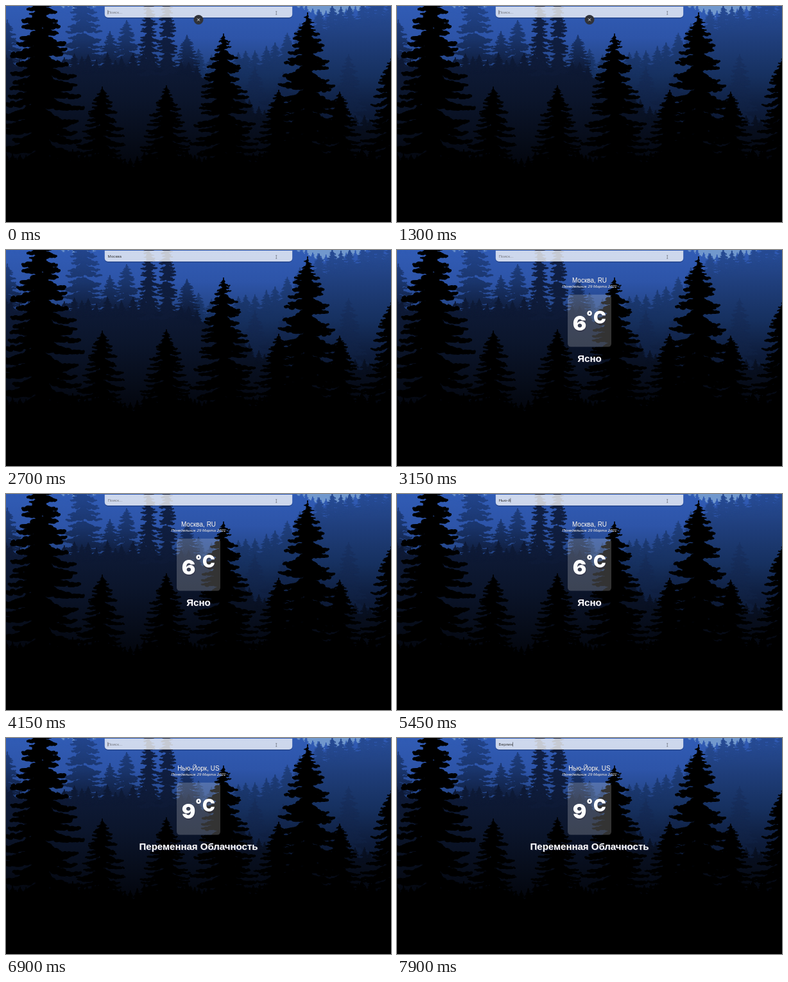
An HTML page with a canvas that plays this animation: 600x338 px, repeating every 8 s.

```html
<!DOCTYPE html>
<html lang="ru">
<head>
<meta charset="utf-8">
<title>Погода</title>
<style>
  html, body { margin: 0; width: 100%; height: 100%; overflow: hidden; background: #000; }
  canvas { display: block; width: 600px; height: 338px; }
</style>
</head>
<body>
<canvas id="stage" width="600" height="338"></canvas>
<script>
const W = 600, H = 338, LOOP = 8000;
const SANS = '"Liberation Sans", Arial, sans-serif';
const BLACK = 'Inter, "Noto Sans", sans-serif';
const ctx = document.getElementById('stage').getContext('2d');

const clamp = v => Math.min(1, Math.max(0, v));
const smooth = v => { const u = clamp(v); return u * u * (3 - 2 * u); };

function seeded(seed) {
  return () => {
    seed = (seed * 1664525 + 1013904223) >>> 0;
    return seed / 4294967296;
  };
}

function vertical(c, y0, y1, ...colors) {
  const g = c.createLinearGradient(0, y0, 0, y1);
  colors.forEach((color, i) => g.addColorStop(i / (colors.length - 1), color));
  return g;
}

function disc(c, x, y, rx, ry = rx) {
  c.beginPath();
  c.ellipse(x, y, rx, ry, 0, 0, 2 * Math.PI);
  c.fill();
}

// Rows of drooping branches, thick at the trunk and ragged towards the tips.
function fir(c, x, top, base, half) {
  const rnd = seeded(Math.round(x * 131 + top * 17 + 9000));
  const tall = base - top;
  const gap = 2.5 + tall * 0.03;
  c.fillRect(x - 0.8, top - 3, 1.6, tall);
  for (let y = top; y < base; y += gap * (0.5 + 0.5 * clamp((y - top) / 60))) {
    const reach = 1.5 + half * Math.pow(clamp((y - top) / tall / 0.6), 0.7);
    for (const side of [-1, 1]) {
      const length = reach * (0.72 + rnd() * 0.4);
      const root = y + (rnd() - 0.5) * gap * 0.7;
      const droop = length * (0.12 + rnd() * 0.2);
      const girth = Math.min(gap, 1.2 + length * 0.35);
      for (let d = 0; d <= length; d += 1.6) {
        const u = d / length;
        const r = girth * (0.62 - 0.42 * u) * (0.75 + rnd() * 0.5);
        disc(c, x + side * d, root + droop * Math.sin(u * 2) + (rnd() - 0.5) * r, r * 1.1, r * 0.9);
      }
    }
  }
}

// A band of ground under a line, edged with small random firs.
function hill(c, fill, line, { from = 0, to = W, step, height }) {
  const rnd = seeded(Math.round(step * 100 + height));
  c.fillStyle = fill;
  c.beginPath();
  c.moveTo(from, H);
  for (let x = from; x <= to; x += 4) c.lineTo(x, line(x));
  c.lineTo(to, H);
  c.fill();
  for (let x = from; x <= to; x += step * (0.6 + rnd() * 0.8)) {
    const tall = height * (0.4 + rnd() * 0.6);
    fir(c, x, line(x) - tall, line(x) + 8, 3 + tall * 0.28);
  }
}

function paintForest() {
  const cv = document.createElement('canvas');
  cv.width = W;
  cv.height = H;
  const c = cv.getContext('2d');
  const haze = vertical(c, 0, 200, '#315cb5', '#2d54a8', '#22427f', '#152b57', '#0c1833');
  c.fillStyle = haze;
  c.fillRect(0, 0, W, H);
  c.filter = 'blur(0.6px)';

  const pale = x => 12 * Math.exp(-(((x - 112) / 32) ** 2)) + 24 * Math.exp(-(((x - 510) / 48) ** 2)) - 4;
  c.fillStyle = '#7198cd';
  c.fillRect(70, -5, 84, 20);
  c.fillRect(446, -5, 154, 35);
  hill(c, haze, pale, { step: 8, height: 9 });

  const farSlope = x => 104 - 84 * smooth((x - 350) / 210);
  hill(c, vertical(c, 10, 210, '#264a92', '#1e3c77', '#16305f', '#0e1d3d', '#081122'), farSlope,
    { from: 300, step: 17, height: 36 });

  const nearSlope = x => 96 + 92 * smooth((x - 255) / 190);
  const slopeTop = '#0e1a36';
  c.fillStyle = vertical(c, 0, 100, '#23458c', '#1a356c', slopeTop);
  [[2, 24], [120, -30], [162, 42], [188, 25], [282, 48]]
    .forEach(([x, top]) => fir(c, x, top, 108, 9 + (108 - top) * 0.16));
  c.fillStyle = vertical(c, 70, 210, '#1a3468', '#12254b', '#0a152c');
  [[388, 98], [432, 106], [534, 78]].forEach(([x, top]) => fir(c, x, top, 230, 30));

  hill(c, vertical(c, 90, 260, slopeTop, '#0b152b', '#070d1b', '#02040a'), nearSlope,
    { step: 13, height: 20 });
  c.fillStyle = vertical(c, 0, 100, '#11224a', slopeTop);
  for (const x of [222, 251]) fir(c, x, -26, 104, 14);

  c.fillStyle = '#000';
  [[55, -38], [470, 13], [339, 46], [150, 129], [250, 127], [425, 134], [520, 137], [603, 78]]
    .forEach(([x, top]) => fir(c, x, top, 260, 18 + (260 - top) * 0.14));
  hill(c, '#000', x => 249 + 5 * Math.sin(x / 23), { step: 8, height: 22 });
  return cv;
}

const forest = paintForest();

const bursts = [
  { keys: 'Москва', at: 1650, step: 110 },
  { keys: 'Нью-й', at: 4300, step: 200 },
  { keys: 'орк', at: 5550, step: 125 },
  { keys: 'Бе', at: 6950, step: 350 },
  { keys: 'рлин', at: 7450, step: 150 }
];
const reports = [
  { at: 2800, city: 'Москва, RU', degrees: '6', sky: 'Ясно' },
  { at: 6000, city: 'Нью-Йорк, US', degrees: '9', sky: 'Переменная Облачность' }
];
const strokes = bursts.flatMap(({ keys, at, step }) =>
  [...keys].map((key, i) => ({ key, at: at + i * step })));

function shadowed(offsetX, offsetY, color, draw) {
  ctx.save();
  ctx.shadowColor = color;
  ctx.shadowOffsetX = offsetX;
  ctx.shadowOffsetY = offsetY;
  draw();
  ctx.restore();
}

function label(text, x, y, font, color = '#fff', align = 'center') {
  ctx.font = font;
  ctx.textAlign = align;
  ctx.fillStyle = color;
  ctx.fillText(text, x, y);
}

function line(...points) {
  ctx.beginPath();
  points.forEach(([x, y], i) => (i ? ctx.lineTo(x, y) : ctx.moveTo(x, y)));
  ctx.stroke();
}

function searchBar(y) {
  ctx.beginPath();
  ctx.roundRect(153.8, y, 292.4, 17, [0, 0, 5, 5]);
}

function drawSearch(t, sentAt) {
  searchBar(2.5);
  ctx.fillStyle = 'rgba(0,0,0,.2)';
  ctx.fill();
  ctx.save();
  searchBar(1);
  ctx.clip();
  ctx.drawImage(forest, 0, 0);
  ctx.fillStyle = 'rgba(255,255,255,.76)';
  ctx.fillRect(0, 0, W, 20);
  ctx.restore();

  const typed = strokes.filter(s => s.at <= t);
  const text = typed.filter(s => s.at > sentAt).map(s => s.key).join('');
  const left = 158.6;
  label(text || 'Поиск...', left, 12, '6.25px ' + SANS, text ? '#313131' : '#74767e', 'left');

  const lastKey = typed.length ? typed[typed.length - 1].at : 0;
  if ((t - lastKey) % 1000 < 500) {
    ctx.fillStyle = '#33343a';
    ctx.fillRect(left + ctx.measureText(text).width, 6.4, 0.6, 6.9);
  }
}

function drawPointer(x, top, bottom) {
  ctx.strokeStyle = '#5a5d68';
  ctx.lineWidth = 0.6;
  line([x, top], [x, bottom]);
  for (const y of [top, bottom]) line([x - 1, y], [x + 1, y]);
}

function drawCloseButton(t) {
  const y = 21.5 - 32 * clamp((t - 1600) / 200) ** 2;
  ctx.fillStyle = '#303238';
  disc(ctx, 300, y, 7.5);
  ctx.strokeStyle = '#f2f2f2';
  ctx.lineWidth = 0.9;
  for (const s of [-2, 2]) line([300 - s, y - 2], [300 + s, y + 2]);
}

function drawReport({ city, degrees, sky }) {
  const tint = 'rgba(50,50,70,.5)';
  shadowed(0.4, 0.4, tint, () => {
    label(city, 300, 51, '10px ' + SANS);
    label('Понедельник 29 Марта 2021', 300, 59, 'italic 6.25px ' + SANS);
  });
  ctx.fillStyle = 'rgba(255,255,255,.2)';
  ctx.beginPath();
  ctx.roundRect(266, 69.8, 68, 81.8, 5);
  ctx.fill();
  shadowed(0.9, 1.9, tint, () => {
    label(degrees, 284.5, 126, '900 32px ' + BLACK);
    label('°', 300, 110.5, '900 21px ' + BLACK);
    label('C', 316, 115, '900 26.6px ' + BLACK);
  });
  shadowed(0.9, 0.9, 'rgba(70,70,100,.6)', () => label(sky, 300, 174.8, 'bold 15px ' + SANS));
}

function render(t) {
  const report = reports.filter(r => r.at <= t).pop();
  ctx.drawImage(forest, 0, 0);
  drawSearch(t, report ? report.at : 0);
  drawPointer(421.3, 8.4, 13.4);
  drawCloseButton(t);
  if (report) drawReport(report);
}

const start = performance.now();
function tick() {
  render((performance.now() - start) % LOOP);
  requestAnimationFrame(tick);
}
tick();
</script>
</body>
</html>
```
